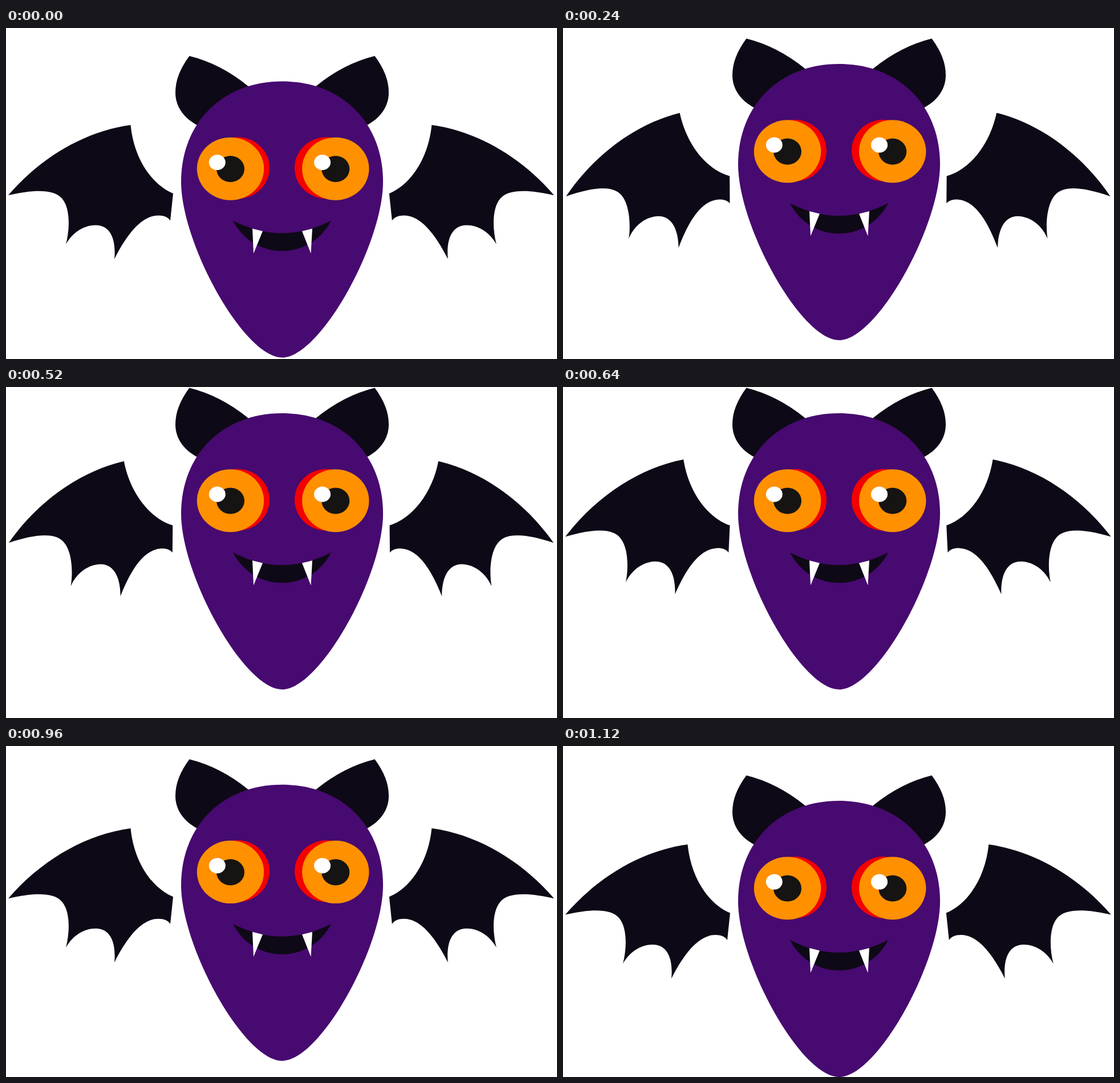
These frames come from a looping animation (966x580 px, 1160 ms). An HTML page:

```html
<!DOCTYPE html>
<html lang="en">
<head>
<meta charset="utf-8">
<title>Flapping bat</title>
<style>
  html, body { margin: 0; width: 100%; height: 100%; overflow: hidden; background: #fff; }
  svg { display: block; width: 966px; height: 580px; }
  .dark { fill: #0e0916; }
  .skin { fill: #470a70; }
  .red { fill: #f40000; }
  .iris { fill: #ff9000; }
  .pupil { fill: #161412; }
  .white { fill: #fff; }
</style>
</head>
<body>
<svg viewBox="0 0 966 580">
  <defs>
    <path id="wing" class="dark" d="M293 242.5 C255 227 224 180 218.5 122.5 C140 133 62 178 4 245.5
      C50 235 84 235 98 251 C113 268 112 305 105 331.5 C117 310 137 298 157 298
      C186 298 193 328 190 357.5 C210 318 236 281 267 281 C277 281 284 284 288 290 Z"/>
    <path id="ear" class="dark" d="M321.5 1.5 Q376 15 424 54 L460 100 L400 150 L336 123
      C312 111 297 90 297 66 C297 44 305 24 321.5 1.5 Z"/>
    <g id="eye">
      <ellipse class="iris" cx="393.5" cy="199.2" rx="58.7" ry="55"/>
      <ellipse class="pupil" cx="393.5" cy="199.5" rx="24.5" ry="23"/>
      <ellipse class="white" cx="370.3" cy="188" rx="14.5" ry="13.5"/>
    </g>
  </defs>
  <g id="bat">
    <g class="flap"><use href="#wing"/></g>
    <g transform="matrix(-1 0 0 1 964.8 0)"><g class="flap"><use href="#wing"/></g></g>
    <use href="#ear"/>
    <use href="#ear" transform="matrix(-1 0 0 1 968 0)"/>
    <path class="skin" d="M484 46 C380 46 307 118 307 222 C307 330 417 530 484 530
      C551 530 661 330 661 222 C661 118 588 46 484 46 Z"/>
    <ellipse class="red" cx="406" cy="197.7" rx="56" ry="54"/>
    <ellipse class="red" cx="562" cy="197.7" rx="56" ry="54"/>
    <use href="#eye"/>
    <use href="#eye" x="184.3"/>
    <path class="dark" d="M398 290 Q484 334 570 290 C534 361 434 361 398 290 Z"/>
    <path class="white" d="M432 304 L450 308.5 L434 347.5 Z M519 308.5 L537 304 L534.5 347.5 Z"/>
  </g>
</svg>
<script>
  const LOOP = 1160, STEP = 40, DROP = 51.5, SWING = 7.2;
  const bat = document.getElementById('bat');
  const flaps = document.querySelectorAll('.flap');

  // rise, hover, then sink faster
  function height(t) {
    const u = (t + 32) % LOOP;
    if (u < 406) return DROP * (1 - u / 406);
    return u < 870 ? 0 : DROP * (u - 870) / 290;
  }

  // wings drop quickly, then lift again more slowly
  function swing(t) {
    if (t < 310) return SWING * (1 - (1 - t / 310) ** 1.5);
    if (t < 376) return SWING;
    return t < 800 ? SWING * (1 - ((t - 376) / 424) ** 1.3) : 0;
  }

  function draw(t) {
    bat.setAttribute('transform', `translate(0 ${height(t)})`);
    flaps.forEach(f => f.setAttribute('transform', `rotate(${-swing(t)} 293 250)`));
  }

  const start = performance.now();
  function tick() {
    const t = (performance.now() - start) % LOOP;
    draw(Math.floor(t / STEP) * STEP);
    requestAnimationFrame(tick);
  }
  tick();
</script>
</body>
</html>
```
